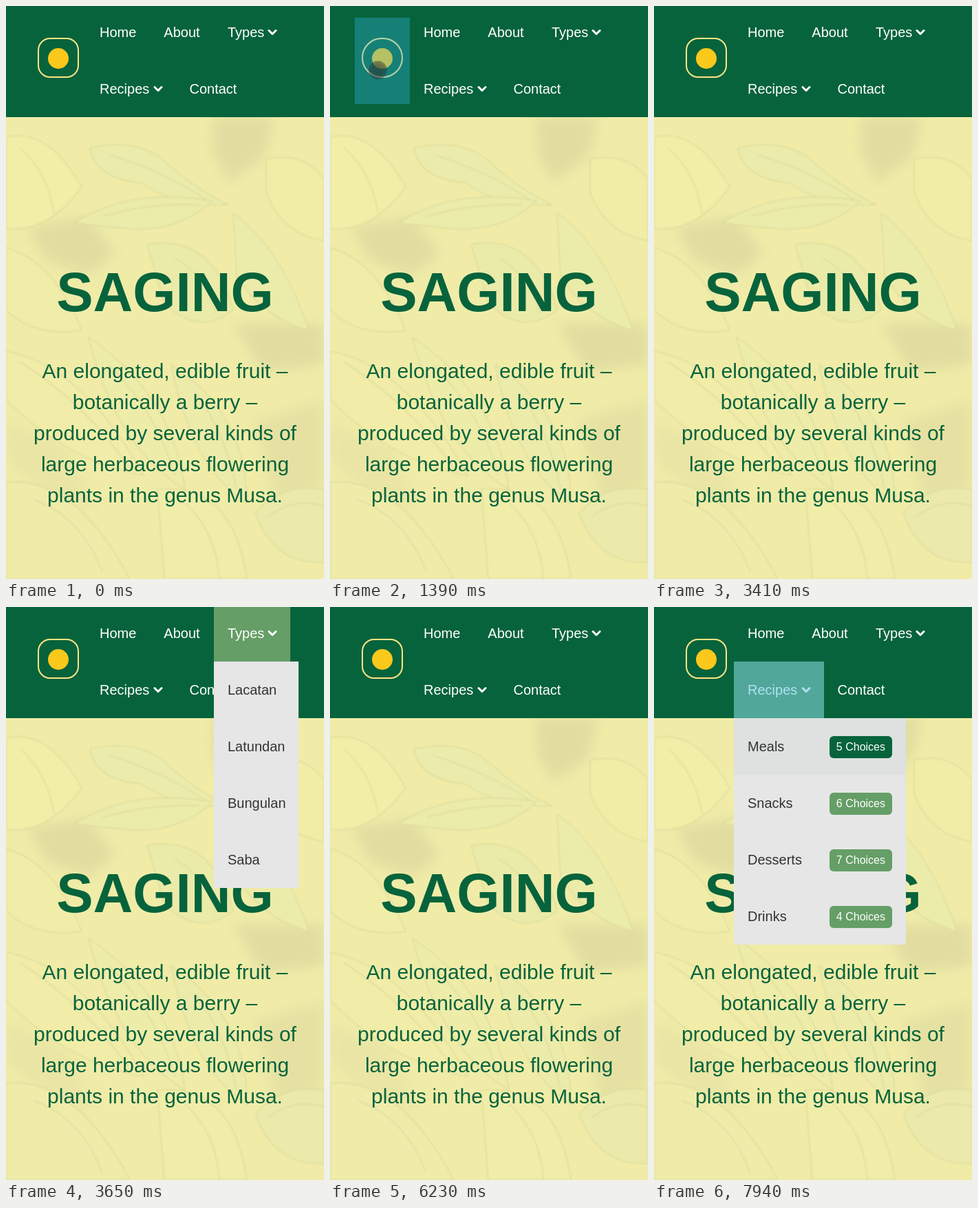
Recreate the animation shown at these times as an HTML page. Size 462 px wide and 830 px high, loop 8000 ms.

```html
<!DOCTYPE html>
<html lang="en">
<head>
<meta charset="utf-8">
<title>Saging</title>
<style>
:root { --green: #07633c; --leaf: #659e66; --loop: 8s step-end infinite; }
* { box-sizing: border-box; }
html, body { margin: 0; width: 100%; height: 100%; overflow: hidden; }
body {
  position: relative;
  background: #f0eca8;
  color: var(--green);
  font: 20px/82px "Liberation Sans", Arial, sans-serif;
  white-space: nowrap;
}
body > * { position: absolute; }
.photo { left: 0; top: 0; width: 462px; height: 830px; }

header { left: 0; top: 0; width: 462px; height: 161px; background: var(--green); }
.logo {
  left: 46px; top: 46px; width: 60px; height: 58px;
  border: 2px solid #ffe585; border-radius: 18px;
  animation: round 8s linear infinite;
}
.logo::before {
  content: ""; position: absolute; left: 13px; top: 13px;
  width: 30px; height: 30px; border-radius: 50%; background: #fbc81c;
}
.item { height: 82px; padding: 0 20px; color: #fff; }
.item svg {
  position: absolute; right: 19px; top: 36px; width: 14px; height: 10px;
  fill: none; stroke: currentColor; stroke-width: 3;
  stroke-linecap: round; stroke-linejoin: round;
}
.row1 { top: -3px; }
.row2 { top: 79px; }
.types { left: 302px; width: 111px; }
.recipes { left: 116px; width: 131px; }

h1 { left: 0; top: 366px; width: 462px; margin: 0; font-size: 80px; line-height: 98px; text-align: center; }
p { left: 0; top: 506px; width: 462px; margin: 0; font-size: 30px; line-height: 45px; text-align: center; }

.menu { background: #e6e6e6; color: #333; }
.menu div { position: relative; height: 82px; padding-left: 20px; }
.menu b {
  position: absolute; right: 20px; top: 26px; height: 32px; padding: 0 10px;
  border-radius: 6px; background: var(--leaf); color: #fff; font: 16px/32px "Liberation Sans", Arial, sans-serif;
}
.menu.a { left: 302px; top: 79px; width: 123px; }
.menu.b { left: 116px; top: 161px; width: 250px; }
.menu.a, .open-a { animation: show-a var(--loop); }
.menu.b, .open-b { animation: show-b var(--loop); }
.open-a, .open-b { background: var(--leaf); }
.first { animation: row var(--loop); }
.first b { animation: badge var(--loop); }

.flash { opacity: 0; background: rgb(51, 181, 229); }
.flash.home { left: 36px; top: 17px; width: 80px; height: 125px; animation: flash-home var(--loop); }
.flash.recipes { top: 79px; height: 82px; animation: flash-recipes var(--loop); }
.bar { left: 457px; top: 2px; width: 3px; height: 686px; background: #808080; opacity: 0; animation: bar var(--loop); }
.tap {
  left: -13.5px; top: -13.5px; width: 27px; height: 27px; border-radius: 50%;
  background: radial-gradient(circle, rgba(45, 50, 50, .58) 40%, rgba(50, 58, 58, .45) 70%);
  animation: tap var(--loop);
}

@keyframes round {
  0%, 14.9% { border-radius: 18px; }
  17.375%, 20.375% { border-radius: 30px; }
  21.375%, 100% { border-radius: 18px; }
}
@keyframes flash-home { 0% { opacity: 0; } 15.5% { opacity: .35; } 18.5%, 100% { opacity: 0; } }
@keyframes flash-recipes { 0% { opacity: 0; } 99.25%, 100% { opacity: .4; } }
@keyframes bar {
  0% { opacity: 0; } 20.375% { opacity: .5; } 24.25% { opacity: .38; }
  26.125% { opacity: .16; } 27.25%, 100% { opacity: 0; }
}
@keyframes show-a { 0% { visibility: hidden; } 43.75% { visibility: visible; } 74%, 100% { visibility: hidden; } }
@keyframes show-b { 0% { visibility: hidden; } 80.875%, 100% { visibility: visible; } }
@keyframes row { 0% { background: #e6e6e6; } 99.25%, 100% { background: #dee1e0; } }
@keyframes badge { 0% { background: #659e66; } 99.25%, 100% { background: #07633c; } }
@keyframes tap {
  0% { opacity: 0; }
  9.75% { opacity: 1; translate: 67px 122px; } 10.625% { opacity: 0; }
  14.5% { opacity: 1; translate: 69px 92.5px; } 18.5% { opacity: 0; }
  28.25% { opacity: 1; translate: 173px 34px; } 29.25% { opacity: 0; }
  31.125% { opacity: 1; translate: 178px 36px; } 32.125% { opacity: 0; }
  34.125% { opacity: 1; translate: 218px 41px; } 35.125% { opacity: 0; }
  40.875% { opacity: 1; translate: 373px 46px; } 42.625% { opacity: 0; }
  43.75% { opacity: 1; translate: 373px 46px; } 45.625% { opacity: 0; }
  61.125% { opacity: 1; translate: 373px 308px; } 62.125% { opacity: 0; }
  64.25% { opacity: 1; translate: 377px 338px; } 65.125% { opacity: 0; }
  76.75% { opacity: 1; translate: 178px 146px; } 77.875% { opacity: 0; }
  80.875% { opacity: 1; translate: 184px 131px; } 82.875%, 100% { opacity: 0; }
}
</style>
</head>
<body>
<svg class="photo" viewBox="0 0 462 830">
  <defs>
    <filter id="soft"><feGaussianBlur stdDeviation="9"/></filter>
    <filter id="edge"><feGaussianBlur stdDeviation="1.2"/></filter>
  </defs>
  <g filter="url(#soft)" fill="#e1dda0">
    <path d="M300 160h90l-15 60-50 35-25-40z"/>
    <path d="M30 320l90-15 40 55-40 30-60-20z"/>
    <path d="M330 460h132v60l-90 10z"/>
    <path d="M0 600l90 40 40 90-60-10-70-60z" opacity=".4"/>
    <path d="M360 600l102-30v130l-70 20z" opacity=".7"/>
  </g>
  <g filter="url(#edge)" stroke="#dedb9c" stroke-width="1.5">
    <path fill="#ebecab" d="M122 206Q190 190 232 226Q270 262 322 288Q250 292 196 256Q130 250 122 206z"/>
    <path fill="#ebebaa" d="M100 314Q180 262 300 282Q250 330 170 322z"/>
    <path fill="#f2eea8" d="M0 190Q60 175 110 262Q60 330 0 322z"/>
    <path fill="#f2eda6" d="M378 222Q430 210 462 250V340Q400 330 378 270z"/>
    <path fill="#ebeba9" d="M205 345Q300 330 330 440Q280 480 230 430z"/>
    <path fill="#ececaa" d="M330 300Q400 350 440 470Q370 450 335 390z"/>
    <path fill="#f0eda8" d="M0 350Q70 370 110 470Q40 480 0 440z"/>
    <path fill="#f1eda8" d="M0 500Q110 520 200 680Q90 660 0 570z"/>
    <path fill="#eeeca9" d="M120 480Q240 560 260 700Q160 640 120 480z"/>
    <path fill="#ecebaa" d="M240 520Q350 590 350 720Q270 670 240 520z"/>
    <path fill="#efecaa" d="M0 690Q100 680 180 830H0z"/>
    <path fill="#f0eda9" d="M220 700Q330 690 350 830H230z"/>
    <path fill="#ebeaaa" d="M362 735Q400 690 462 700V806Q390 810 362 735z"/>
    <path fill="none" d="M150 215Q230 240 290 280M20 205Q60 240 70 300M140 305Q210 285 280 288M245 365Q290 390 305 445M20 515Q120 580 180 670M150 520Q220 590 245 680M275 560Q320 620 335 700M40 715Q110 740 140 820M260 720Q305 760 310 830M380 740Q420 710 462 725"/>
  </g>
</svg>

<header></header>
<div class="logo"></div>
<div class="item row1 types open-a"></div>
<div class="item row2 recipes open-b"></div>
<div class="item row1" style="left:116px">Home</div>
<div class="item row1" style="left:209.3px">About</div>
<div class="item row1 types">Types<svg viewBox="0 0 14 10"><path d="M2 2.5l5 5 5-5"/></svg></div>
<div class="item row2 recipes">Recipes<svg viewBox="0 0 14 10"><path d="M2 2.5l5 5 5-5"/></svg></div>
<div class="item row2" style="left:246.5px">Contact</div>

<h1>SAGING</h1>
<p>An elongated, edible fruit –<br>botanically a berry –<br>produced by several kinds of<br>large herbaceous flowering<br>plants in the genus Musa.</p>

<div class="menu a"><div>Lacatan</div><div>Latundan</div><div>Bungulan</div><div>Saba</div></div>
<div class="menu b">
  <div class="first">Meals<b>5 Choices</b></div>
  <div>Snacks<b>6 Choices</b></div>
  <div>Desserts<b>7 Choices</b></div>
  <div>Drinks<b>4 Choices</b></div>
</div>

<div class="flash home"></div>
<div class="flash recipes"></div>
<div class="bar"></div>
<div class="tap"></div>
</body>
</html>
```
